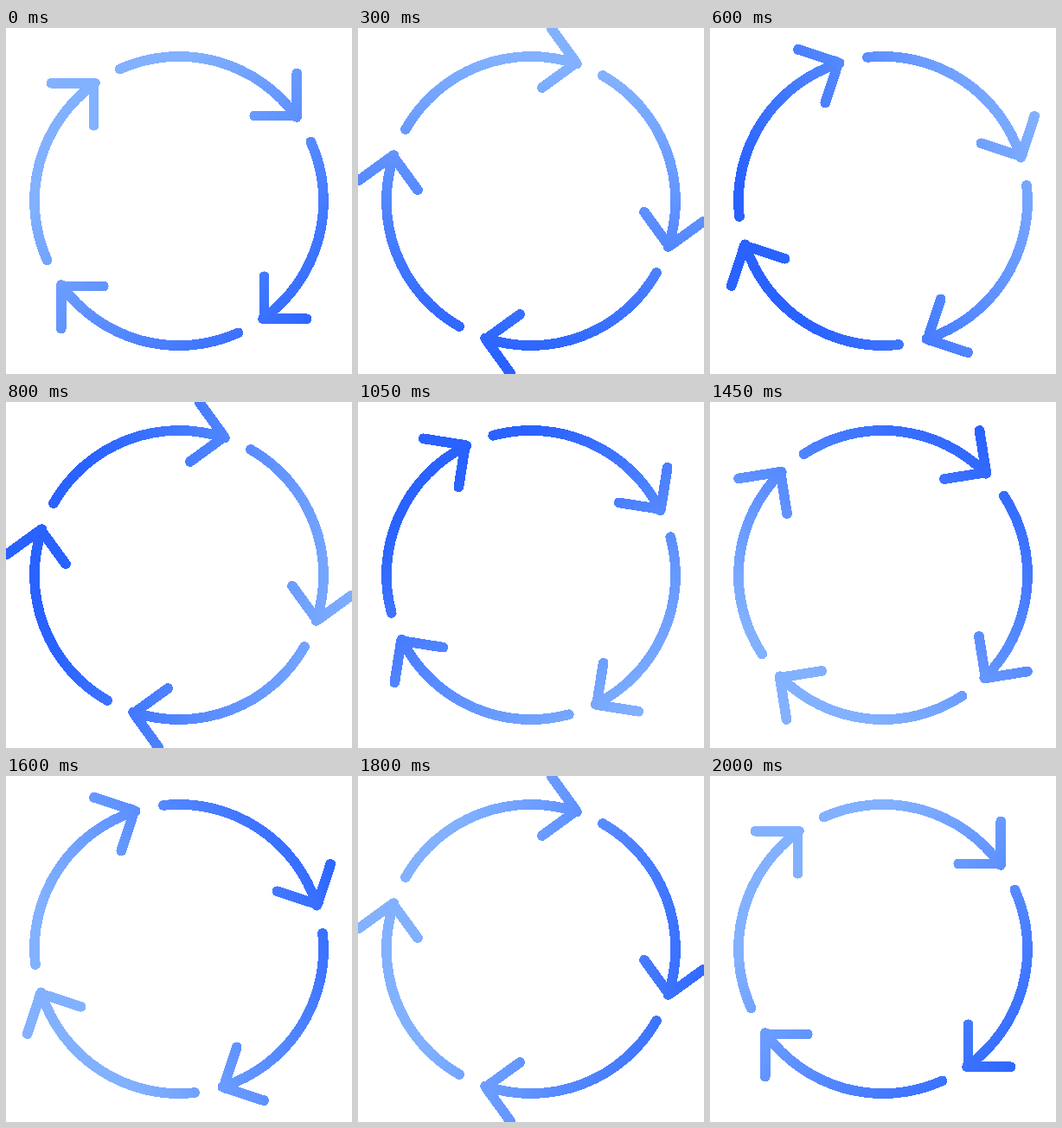
Write an HTML page that moves like this. It is 400 by 400 pixels and loops after 2020 ms.

```html
<!DOCTYPE html>
<html lang="en">
<head>
<meta charset="utf-8">
<title>Cycle arrows</title>
<style>
  html, body { margin: 0; width: 100%; height: 100%; overflow: hidden; background: #fff; }
  svg { display: block; width: 100vw; height: 100vh; }
  path {
    fill: none; stroke: url(#blue); stroke-width: 11.7;
    stroke-linecap: round; stroke-linejoin: round; shape-rendering: crispEdges;
  }
</style>
</head>
<body>
<svg viewBox="-200 -200 400 400">
  <defs>
    <linearGradient id="blue" gradientUnits="userSpaceOnUse" x1="-112" y1="-116" x2="126" y2="130">
      <stop offset="0" stop-color="#82b1ff"/>
      <stop offset="1" stop-color="#2962ff"/>
    </linearGradient>
  </defs>
  <path id="ring"/>
</svg>
<script>
  const LOOP = 2020, STEP = 25, TURN = 4.5;
  const RADIUS = 167.1;
  const PIVOT = [53, 15]; // the gradient turns around a point right of the centre
  const tail = [-68.5, -152.4], arcEnd = [136, -97.1], tip = [136.3, -98.5];
  const barbs = [[87.3, -98.5], [136.3, -147.5]];

  const ring = document.getElementById('ring');
  const blue = document.getElementById('blue');

  const quarterTurn = ([x, y], n) => n ? quarterTurn([-y, x], n - 1) : [x, y];

  // One arrow per quadrant, joined in one path so they share the gradient.
  function arrow(n) {
    const at = p => quarterTurn(p, n).join(' ');
    return `M${at(tail)}A${RADIUS} ${RADIUS} 0 0 1 ${at(arcEnd)}` +
           `M${at(barbs[0])}L${at(tip)}L${at(barbs[1])}`;
  }

  ring.setAttribute('d', [0, 1, 2, 3].map(arrow).join(''));

  // 40 steps a second, each starting on a whole hundredth of a second.
  function draw(ms) {
    const tick = Math.floor((ms % LOOP) / 10) * 10;
    const angle = Math.floor((tick + 5) / STEP) * TURN;
    ring.setAttribute('transform', `rotate(${angle})`);
    // Undo the ring's turn first, since the gradient lives in its space.
    blue.setAttribute('gradientTransform',
      `rotate(${-angle}) translate(${PIVOT}) rotate(${angle})`);
  }

  const start = performance.now();
  function loop() {
    draw(performance.now() - start);
    requestAnimationFrame(loop);
  }
  loop();
</script>
</body>
</html>
```
